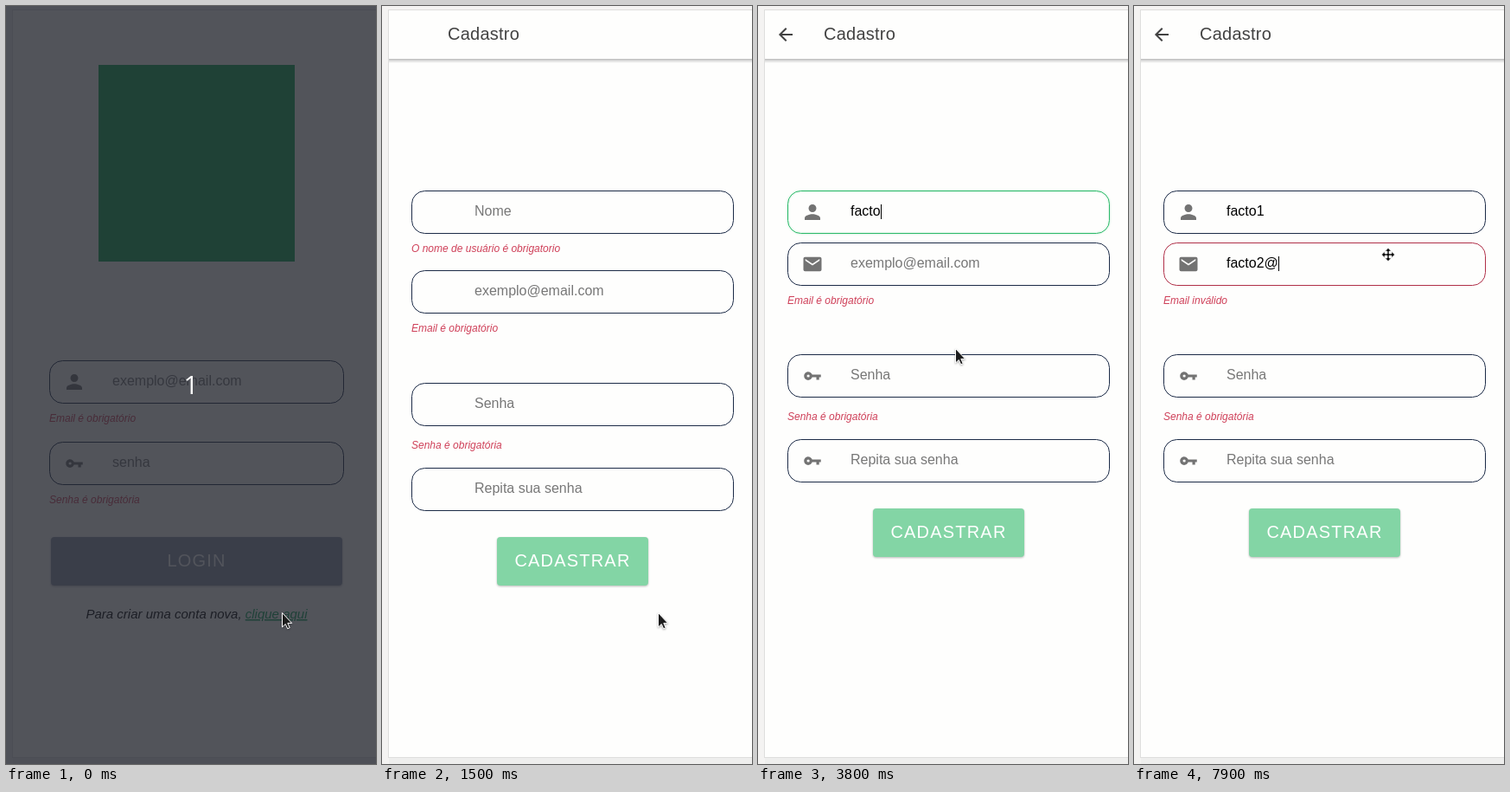
These frames come from a looping animation (428 px wide and 875 px high, 8 s). An HTML page:

```html
<!DOCTYPE html>
<html lang="pt-BR">
<head>
<meta charset="utf-8">
<title>Cadastro</title>
<style>
  html, body { margin: 0; width: 100%; height: 100%; overflow: hidden; background: #f4f3f2; }
  svg { display: block; width: 428px; height: 875px; font: 16px "Liberation Sans", Arial, sans-serif; }
  text { white-space: pre; }
  .box { fill: none; stroke: #1c2b47; }
  .box.bad { stroke: #b02f48; }
  .box.ok { stroke: #2fbb6c; filter: drop-shadow(0 0 1px #2fbb6c66); }
  .hint { fill: #777; }
  .err { font-size: 12px; font-style: italic; fill: #cf4059; }
  .icon { fill: #737373; }
  .label { font-size: 20px; letter-spacing: 1.2px; fill: #fff; }
  .btn { filter: drop-shadow(0 1.5px 1px #0004); }
  .note { font-size: 15px; font-style: italic; }
  .link { fill: #12a558; text-decoration: underline; }
  .count { font: 30px "Open Sans", sans-serif; fill: #fff; }
  #arrow { filter: drop-shadow(0 1px 1px #0005); }
</style>
</head>
<body>
<svg viewBox="0 0 428 875">
  <defs>
    <linearGradient id="fade" x2="0" y2="1">
      <stop offset="0" stop-color="#b9b9b9"/>
      <stop offset=".4" stop-color="#dadada"/>
      <stop offset="1" stop-color="#fefefd"/>
    </linearGradient>
    <symbol id="person" viewBox="0 0 512 512"><path d="M256 256c52.8 0 96-43.2 96-96s-43.2-96-96-96-96 43.2-96 96 43.2 96 96 96zm0 48c-63.6 0-192 32.4-192 96v48h384v-48c0-63.6-128.4-96-192-96z"/></symbol>
    <symbol id="mail" viewBox="0 0 512 512"><path d="M437 80H75c-24 0-43 19-43 43v266c0 24 19 43 43 43h362c24 0 43-19 43-43V123c0-24-19-43-43-43zM432 171L256 288 80 171v-43l176 117 176-117z"/></symbol>
    <symbol id="key" viewBox="0 0 512 512"><path fill-rule="evenodd" d="M249 224c-14-40-55-72-100-72-57 0-101 47-101 104s46 104 103 104c45 0 84-32 98-72h103v64h69v-64h43v-64zm-97 66.500a34.500 34.500 0 1 1 0-69 34.500 34.500 0 0 1 0 69z"/></symbol>
  </defs>

  <rect width="428" height="875" fill="#f4f3f2"/>
  <rect y="868" x="8" width="420" height="7" fill="#eeeeed"/>
  <rect x="7.500" y="4.500" width="430" height="863" fill="#fefefd" stroke="#dededd"/>

  <g id="login">
    <rect x="107" y="68" width="227" height="227" fill="#0ca850"/>
    <rect class="box" x="50.500" y="409.500" width="340" height="49" rx="15"/>
    <use class="icon" href="#person" x="67" y="422" width="24" height="24"/>
    <text class="hint" x="123" y="438">exemplo@email.com</text>
    <text class="err" x="50" y="480">Email é obrigatório</text>
    <rect class="box" x="50.500" y="503.500" width="340" height="49" rx="15"/>
    <use class="icon" href="#key" x="67" y="516" width="24" height="24"/>
    <text class="hint" x="123" y="532">senha</text>
    <text class="err" x="50" y="574">Senha é obrigatória</text>
    <rect class="btn" x="52" y="613" width="337" height="56" rx="4" fill="#8d98ad"/>
    <text class="label" x="186.400" y="647">LOGIN</text>
    <text class="note" x="92.500" y="707">Para criar uma conta nova, <tspan class="link">clique aqui</tspan></text>
  </g>

  <g id="signup">
    <rect x="8" y="61" width="420" height="5" fill="url(#fade)"/>
    <path class="late" fill="#424242" transform="translate(20 21) scale(.046875)" d="M427 234.600H167.300L287 115l-31-30L85 256l171 171 30-30-118.700-119.600H427z"/>
    <text x="76" y="39" font-size="20" letter-spacing=".25" fill="#424242">Cadastro</text>

    <rect class="box" id="userBox" x="34.500" y="213.500" width="372" height="49" rx="15"/>
    <use class="icon late" href="#person" x="51" y="226" width="24" height="24"/>
    <text id="user" x="107" y="242"></text>
    <text class="err" id="userErr" x="34" y="284"></text>

    <g id="mailRow">
      <rect class="box" id="mailBox" x="34.500" y="305.500" width="372" height="49" rx="15"/>
      <use class="icon late" href="#mail" x="51" y="318" width="24" height="24"/>
      <text id="email" x="107" y="334"></text>
      <text class="err" id="mailErr" x="34" y="376"></text>
    </g>

    <g id="rest">
      <rect class="box" x="34.500" y="435.500" width="372" height="49" rx="15"/>
      <use class="icon late" href="#key" x="51" y="448" width="24" height="24"/>
      <text class="hint" x="107" y="464">Senha</text>
      <text class="err" x="34" y="511">Senha é obrigatória</text>
      <rect class="box" x="34.500" y="533.500" width="372" height="49" rx="15"/>
      <use class="icon late" href="#key" x="51" y="546" width="24" height="24"/>
      <text class="hint" x="107" y="562">Repita sua senha</text>
      <rect class="btn" x="133" y="613" width="175" height="56" rx="4" fill="#83d5a5"/>
      <text class="label" x="153.400" y="647">CADASTRAR</text>
    </g>
    <rect id="caret" width="1" height="17"/>
  </g>

  <g id="countdown">
    <rect width="428" height="875" fill="#24272f" opacity=".79"/>
    <text class="count" x="214" y="448" text-anchor="middle">1</text>
  </g>

  <path id="arrow" d="M.5.5V17L4.300 13.500 6.700 18.800 9.200 17.700 6.800 12.400H11.700z" fill="#1c1c1c" stroke="#fff"/>
  <path id="move" transform="translate(294 287)" stroke="#fff" stroke-width=".6"
    d="M0-7.500L3.500-4H1v3h3v-2.500L7.500 0 4 3.500V1H1v3h2.500L0 7.500-3.500 4H-1V1h-3v2.500L-7.500 0-4-3.500V-1h3v-3h-2.500z"/>
</svg>
<script>
const LOOP = 8000, STEP = 100;
const $ = id => document.getElementById(id);
const late = document.querySelectorAll('.late');

const userKeys = [[3400, 'f'], [3600, 'fact'], [3800, 'facto'], [4700, 'facto1']];
const mailKeys = [[5900, 'f'], [6000, 'fac'], [6300, 'facto'], [7300, 'facto2'], [7900, 'facto2@']];
const blinkStarts = [2300, 5000, ...userKeys.map(k => k[0]), ...mailKeys.map(k => k[0])];
const stops = [[0, 0, 319, 700], [1600, 2200, 138, 249], [2400, 2800, 228, 395], [4500, 4900, 292, 284]];

const show = (el, on) => el.setAttribute('visibility', on ? 'inherit' : 'hidden');
const shift = (el, x, y) => el.setAttribute('transform', `translate(${x} ${y})`);
const typed = (keys, t) => keys.reduce((s, [at, v]) => t >= at ? v : s, '');
const ease = p => p * p * (3 - 2 * p);

function field(el, value, hint) {
  el.textContent = value || hint;
  el.setAttribute('class', value ? '' : 'hint');
}

function pointer(t) {
  let [, , x, y] = stops[0];
  for (const [from, to, tx, ty] of stops.slice(1)) {
    const p = ease(Math.min(1, Math.max(0, (t - from) / (to - from))));
    x += (tx - x) * p;
    y += (ty - y) * p;
  }
  return [Math.round(x), Math.round(y)];
}

function draw(t) {
  const user = typed(userKeys, t), email = typed(mailKeys, t);
  const valid = user.length >= 3;
  const onUser = t >= 2300 && t < 5100, onMail = t >= 5100;

  show($('countdown'), t < 200);
  show($('login'), t < 1100);
  show($('signup'), t >= 1500);
  late.forEach(el => show(el, t >= 1700));

  field($('user'), user, 'Nome');
  field($('email'), email, 'exemplo@email.com');
  $('userErr').textContent = valid ? '' : 'O nome de usuário ' +
    (user ? 'deve conter pelo menos 3 caracteres' : 'é obrigatorio');
  $('mailErr').textContent = email ? 'Email inválido' : 'Email é obrigatório';
  $('userBox').setAttribute('class', 'box' + (onUser ? valid ? ' ok' : ' bad' : ''));
  $('mailBox').setAttribute('class', 'box' + (onMail ? ' bad' : ''));
  shift($('mailRow'), 0, valid ? -32 : 0);
  shift($('rest'), 0, valid ? -33 : 0);

  const last = Math.max(...blinkStarts.filter(s => s <= t), 0);
  const width = (onMail ? email : user) ? $(onMail ? 'email' : 'user').getComputedTextLength() : 0;
  show($('caret'), (onUser || onMail) && Math.floor((t - last) / 500) % 2 === 0);
  $('caret').setAttribute('x', Math.round(107 + width));
  $('caret').setAttribute('y', onMail ? 289 : 229);

  show($('arrow'), t < 6600);
  show($('move'), t >= 6600);
  shift($('arrow'), ...pointer(t));
}

const start = performance.now();
function tick() {
  const t = (performance.now() - start) % LOOP;
  draw(Math.floor(t / STEP) * STEP);
  requestAnimationFrame(tick);
}
tick();
</script>
</body>
</html>
```
